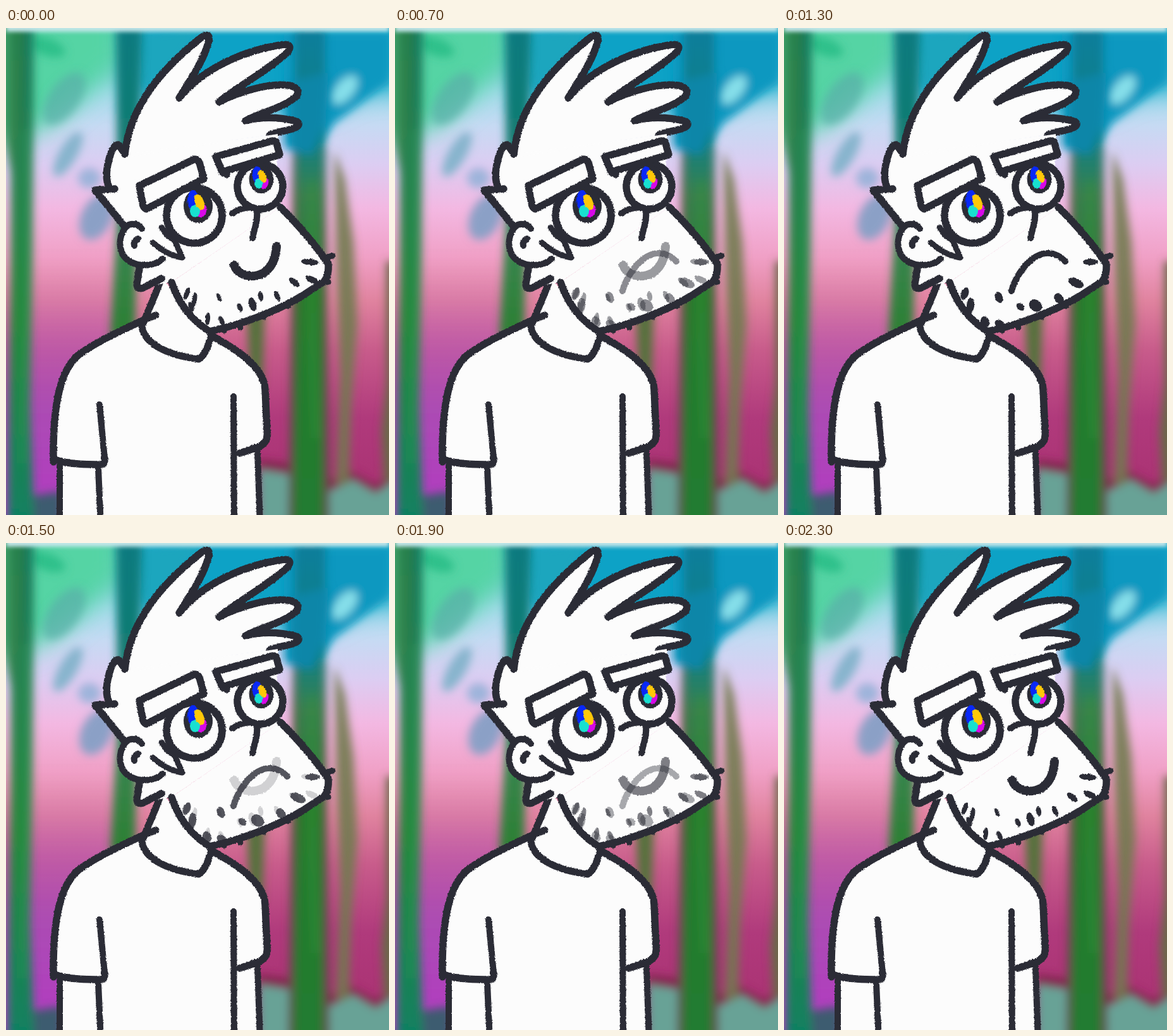
An HTML page for the animation above (2.6 s loop, 606 by 772 pixels).

```html
<!DOCTYPE html>
<html lang="en">
<head>
<meta charset="utf-8">
<title>Smile and frown</title>
<style>
html, body { margin: 0; width: 100%; height: 100%; overflow: hidden; }
svg { display: block; width: 606px; height: 772px; }
.ink { fill: none; stroke: #2b2c36; stroke-width: 11.5; stroke-linecap: round; stroke-linejoin: round; }
.skin { fill: #fcfcfc; }
.dark { fill: #2b2c36; stroke: none; }
</style>
</head>
<body>
<svg viewBox="0 0 606 772">
<defs>
  <linearGradient id="sky" x2="0" y2="1">
    <stop offset="0" stop-color="#58c8d0"/>
    <stop offset=".13" stop-color="#a4dcec"/>
    <stop offset=".2" stop-color="#c6daf3"/>
    <stop offset=".28" stop-color="#dccdf2"/>
    <stop offset=".37" stop-color="#f3b8e2"/>
    <stop offset=".47" stop-color="#f0a0c6"/>
    <stop offset=".56" stop-color="#e0839f"/>
    <stop offset=".66" stop-color="#c85c8b"/>
    <stop offset=".8" stop-color="#b03a7c"/>
    <stop offset="1" stop-color="#a83070"/>
  </linearGradient>
  <linearGradient id="violet" x2="0" y2="1">
    <stop offset="0" stop-color="#c868c0" stop-opacity="0"/>
    <stop offset=".5" stop-color="#ab4cb4"/>
    <stop offset="1" stop-color="#b436c4"/>
  </linearGradient>
  <linearGradient id="trunk" gradientUnits="userSpaceOnUse" x1="0" y1="0" x2="0" y2="772">
    <stop offset="0" stop-color="#167a60"/>
    <stop offset=".3" stop-color="#27804e"/>
    <stop offset=".6" stop-color="#26883a"/>
    <stop offset="1" stop-color="#118060"/>
  </linearGradient>
  <linearGradient id="mid" gradientUnits="userSpaceOnUse" x1="0" y1="0" x2="0" y2="480">
    <stop offset="0" stop-color="#087a80"/>
    <stop offset=".4" stop-color="#157c70"/>
    <stop offset=".75" stop-color="#38844c"/>
    <stop offset="1" stop-color="#2c8034"/>
  </linearGradient>
  <linearGradient id="big" gradientUnits="userSpaceOnUse" x1="0" y1="0" x2="0" y2="772">
    <stop offset="0" stop-color="#067e9c"/>
    <stop offset=".24" stop-color="#148080"/>
    <stop offset=".34" stop-color="#38804e"/>
    <stop offset=".55" stop-color="#267a2c"/>
    <stop offset="1" stop-color="#207c30"/>
  </linearGradient>
  <filter id="b3" filterUnits="userSpaceOnUse" x="-40" y="-40" width="690" height="860"><feGaussianBlur stdDeviation="3"/></filter>
  <filter id="b7" filterUnits="userSpaceOnUse" x="-40" y="-40" width="690" height="860"><feGaussianBlur stdDeviation="7"/></filter>
  <filter id="b20" x="-50%" y="-50%" width="200%" height="200%"><feGaussianBlur stdDeviation="20"/></filter>
  <filter id="rough" filterUnits="userSpaceOnUse" x="0" y="0" width="606" height="790" color-interpolation-filters="sRGB">
    <feTurbulence type="fractalNoise" baseFrequency=".4" numOctaves="2" seed="4"/>
    <feDisplacementMap in="SourceGraphic" scale="3" xChannelSelector="R" yChannelSelector="G"/>
  </filter>
</defs>

<!-- forest -->
<rect width="606" height="772" fill="url(#sky)"/>
<rect x="-40" y="380" width="230" height="440" fill="url(#violet)" filter="url(#b20)"/>
<g filter="url(#b20)">
  <path d="M-20-40H185V60Q120 110 85 140T-20 180Z" fill="#54d4a4"/>
  <path d="M205-40H640V95L560 100 500 130H205Z" fill="#0aa2c6"/>
</g>
<g filter="url(#b7)">
  <path d="M205 8L310 0 260 70 215 100Z" fill="#1ba6be"/>
  <path d="M440 10H606V85L570 112 520 150 490 195 440 190Z" fill="#0898c0"/>
  <ellipse cx="92" cy="112" rx="24" ry="48" transform="rotate(35 92 112)" fill="#58b0a8" opacity=".75"/>
  <ellipse cx="65" cy="30" rx="30" ry="14" transform="rotate(20 65 30)" fill="#2fc08a"/>
  <ellipse cx="98" cy="200" rx="14" ry="40" transform="rotate(30 98 200)" fill="#86b4cc"/>
  <ellipse cx="143" cy="300" rx="24" ry="38" transform="rotate(25 143 300)" fill="#8ba0c6"/>
  <ellipse cx="132" cy="238" rx="18" ry="16" fill="#9db4da"/>
  <ellipse cx="536" cy="98" rx="14" ry="27" transform="rotate(40 536 98)" fill="#86dfea"/>
</g>
<g filter="url(#b7)">
  <path d="M400 684L450 690 520 716 545 702 585 724 620 696V800H400Z" fill="#802850"/>
  <path d="M400 700L450 708 515 734 548 716 585 738 620 714V800H400Z" fill="#68a296"/>
  <path d="M40 742L90 734V820H40Z" fill="#3e5c70"/>
  <path d="M8-30H44L42 350 38 600 46 820H2L8 400Z" fill="url(#trunk)"/>
  <path d="M-10-10H30L24 160 8 230-10 150Z" fill="#2f8044" opacity=".7"/>
  <path d="M30 160L32 430 26 690" fill="none" stroke="#30985a" stroke-width="8" opacity=".6"/>
  <path d="M174-30H216L208 300 204 490H165L176 300Z" fill="url(#mid)"/>
  <path d="M380 430H410L406 570H386Z" fill="#57713c"/>
  <path d="M454 190H506L512 820H446Z" fill="#604a48"/>
  <path d="M456-30H506L502 400 502 820H454L460 400Z" fill="url(#big)"/>
  <path d="M485 240L484 500 490 650" fill="none" stroke="#36943a" stroke-width="8" opacity=".6"/>
  <path d="M520 195L536 240 550 340 556 470 546 600 542 724H522L529 550 522 350Z" fill="#727a50" opacity=".9"/>
  <path d="M602 370V560L594 640 598 720H640V370Z" fill="#6b6848"/>
  <path d="M450 85L510 70 506 150 484 200 452 196Z" fill="#0786a8"/>
</g>
<path d="M0 0H606" stroke="#c4e6ea" stroke-width="12" filter="url(#b3)"/>

<g class="ink" filter="url(#rough)">
  <!-- body -->
  <path class="skin" stroke="none" d="M84 800V690L76 688Q76 560 105 528 140 500 218 462L245 395 325 487Q400 530 410 568L413 655 398 672 402 800Z"/>
  <path d="M218 463C180 480 140 499 115 518 82 545 74 610 75 688M76 684C100 692 130 692 151 692Q157 690 156 682"/>
  <path d="M326 488C360 507 408 535 410 573L413 638Q416 656 400 664L370 674"/>
  <path d="M156 682L148 597M360 584L361 790M85 694V790M146 698L150 790M398 672L402 790" stroke-width="10"/>
  <path d="M246 395C237 424 226 444 215 473 219 504 264 520 305 525 317 517 321 500 325 486M216 464L237 455" stroke-width="11"/>

  <!-- head -->
  <path class="skin" stroke="none" d="M190 198L417 170 428 178 430 204 428 222 438 250 434 284 262 403 208 412 212 378 180 350 186 312 142 256 162 250 168 188Z"/>
  <path class="skin" d="M188 200C196 120 252 60 309 15Q323 6 321 20C312 55 290 84 274 111C308 68 370 36 440 26Q454 26 446 38C416 66 374 88 337 117C380 96 420 88 448 91Q467 95 460 108C438 127 408 132 379 147C410 139 440 143 460 148Q468 154 455 159C443 164 430 163 417 170"/>
  <path class="skin" stroke="none" d="M185 206L430 168V204L215 260Z"/>
  <path d="M188 199L178 185Q168 185 162 212 156 238 163 252M172 255L141 257 187 314"/>
  <path class="skin" d="M215 318Q207 308 194 312C180 322 176 345 186 361 200 380 232 380 248 366" stroke-width="10"/>
  <path d="M209 334Q201 339 203 345" stroke-width="10"/>
  <path class="skin" d="M246 316Q256 332 267 337L279 364Q256 361 232 340" stroke-width="9"/>
  <path d="M211 382L207 405Q207 415 217 412L246 397"/>
  <path class="skin" d="M262 403C272 434 292 462 322 481C372 470 426 450 468 425L500 404Q511 398 510 374C494 350 466 315 434 284"/>
  <path d="M508 363L517 361M503 402L510 403M445 438L446 441M406 456L408 458M368 470L371 475M343 476L345 480" stroke-width="9"/>

  <!-- features -->
  <circle class="skin" cx="298" cy="297" r="44"/>
  <circle class="skin" cx="402" cy="251" r="36"/>
  <path class="skin" d="M211 250L298 208Q305 208 307 217L313 239 222 287Q217 285 216 278Z"/>
  <path class="skin" d="M332 204L421 179Q428 178 429 186L433 201 342 228Z"/>
  <path d="M342 228L349 232"/>
  <path d="M358 294C370 285 394 280 397 290 399 305 393 318 390 333" stroke-width="10"/>
  <g id="iris" stroke="none">
    <ellipse class="dark" cx="304" cy="282" rx="23" ry="27"/>
    <ellipse cx="296" cy="273" rx="9" ry="16" fill="#0828f8"/>
    <ellipse cx="310" cy="290" rx="7" ry="11" transform="rotate(20 310 290)" fill="#d808e8"/>
    <ellipse cx="299" cy="290" rx="8" ry="10" fill="#18e0d0"/>
    <ellipse cx="306" cy="276" rx="7" ry="13" transform="rotate(-22 306 276)" fill="#ffc808"/>
  </g>
  <use href="#iris" transform="translate(404 240) scale(.84 .82) translate(-304 -282)"/>
</g>

<g id="smile" class="ink" filter="url(#rough)">
  <path d="M361 376C370 401 425 405 428 346" stroke-width="14"/>
</g>
<g id="frown" class="ink" filter="url(#rough)">
  <path d="M360 417C370 380 410 334 445 370" stroke-width="10"/>
</g>
</svg>
<script>
const smile = document.getElementById('smile');
const frown = document.getElementById('frown');

// Stubble: x, y, half length, half width, angle
function stubble(group, hairs) {
  for (const [x, y, rx, ry, turn] of hairs) {
    const hair = document.createElementNS('http://www.w3.org/2000/svg', 'ellipse');
    const attrs = { class: 'dark', rx, ry, transform: `translate(${x} ${y}) rotate(${turn})` };
    for (const name in attrs) hair.setAttribute(name, attrs[name]);
    group.append(hair);
  }
}

stubble(smile, [
  [481, 371, 14, 5, 5], [484, 399, 11, 5, 25], [456, 403, 10, 5, 40],
  [429, 425, 9, 4, 65], [403, 425, 8, 4, 80], [390, 438, 11, 6, 75],
  [370, 443, 7, 4, 65], [337, 427, 7, 3, 65], [341, 464, 8, 4, 65],
  [319, 461, 10, 4, 95], [298, 431, 12, 4, 100], [286, 421, 10, 4, 110],
  [293, 442, 8, 4, 70]
]);
stubble(frown, [
  [485, 371, 12, 5, 0], [462, 404, 13, 7, 25], [435, 429, 9, 7, 50],
  [398, 440, 11, 9, 40], [374, 442, 7, 5, 40], [340, 427, 9, 6, 70],
  [318, 466, 9, 7, 70], [341, 469, 8, 6, 30], [286, 421, 10, 6, 110],
  [295, 440, 13, 6, 95]
]);

function draw(now) {
  const step = Math.floor(now % 2600 / 100);
  const sad = step < 13 ? step / 13 : Math.max(0, 1 - (step - 13) / 10);
  smile.style.opacity = 1 - sad;
  frown.style.opacity = sad;
}

const start = performance.now();
function tick() {
  draw(performance.now() - start);
  requestAnimationFrame(tick);
}
tick();
</script>
</body>
</html>
```
